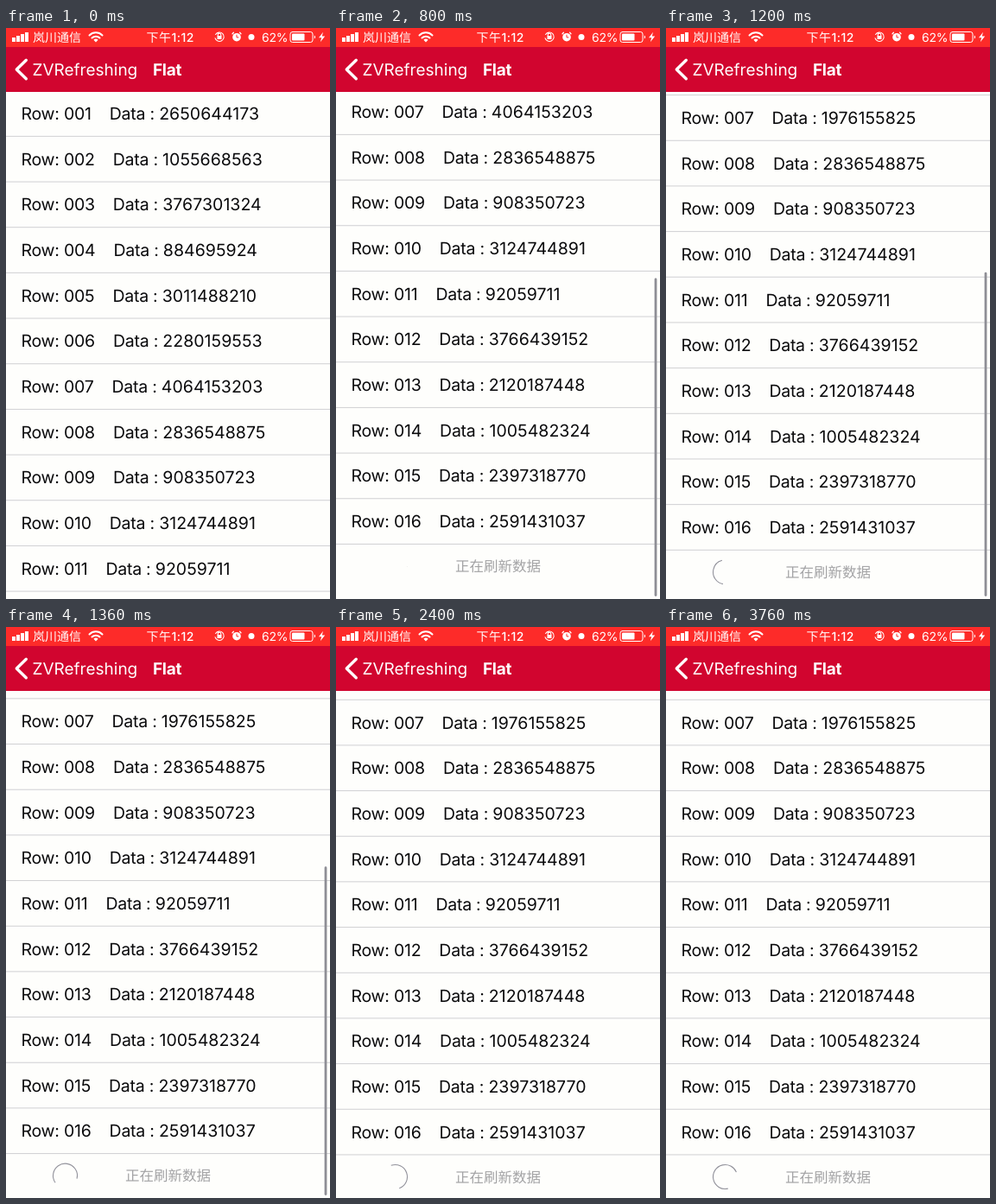
An HTML page that plays this animation: 375x661 px, repeating every 3.84 s.

```html
<!DOCTYPE html>
<html lang="zh-CN">
<head>
<meta charset="utf-8">
<title>Flat list</title>
<style>
  html, body { margin: 0; width: 100%; height: 100%; overflow: hidden; background: #fefefc; }
  svg { display: block; width: 375px; height: 661px; }
  text { font-family: Inter, "Noto Sans CJK SC", "Noto Sans CJK", sans-serif; white-space: pre; text-rendering: geometricPrecision; }
  .row { font-size: 19.5px; letter-spacing: -.24px; fill: #0a0a0c; }
  .value { letter-spacing: .04px; }
  .nav { font-size: 19px; }
  .title { font-weight: 700; letter-spacing: -.28px; }
  .status { font-size: 14px; }
  .line { fill: none; stroke: #fff; stroke-linecap: round; stroke-linejoin: round; }
</style>
</head>
<body>
<svg viewBox="0 0 375 661">
  <rect width="375" height="661" fill="#fefefc"/>
  <g id="content">
    <g id="rows"></g>
    <text x="187.5" y="947.2" font-size="16.5" text-anchor="middle" fill="#a3a3a5">正在刷新数据</text>
    <circle id="spinner" cx="68.5" cy="941" r="14" pathLength="360" fill="none" stroke="#92929b" stroke-width="1.1"/>
  </g>
  <rect id="bar" x="368.6" width="2.8" rx="1.4" fill="#8e8e95"/>

  <rect width="375" height="74" fill="#d1052f"/>
  <rect width="375" height="22" fill="#fd2b29"/>
  <g fill="#fff">
    <path class="line" d="M23.3 37.2 12.3 48 23.3 58.8" stroke-width="3.4"/>
    <text class="nav" x="30.5" y="55">ZVRefreshing</text>
    <text class="nav title" x="170" y="55">Flat</text>

    <path d="M7 11h4v5h-4z M12 9h4v7h-4z M17 7h4v9h-4z M22 5h4v11h-4z"/>
    <text class="status" x="31" y="15.5">岚川通信</text>
    <path class="line" d="M96.5 8.5a10.5 10.5 0 0 1 15 0 M99.5 11.5a6.4 6.4 0 0 1 9 0" stroke-width="2"/>
    <path d="M104 16.5l-2.6-2.8a3.8 3.8 0 0 1 5.2 0z"/>
    <text class="status" x="162.5" y="15.5" font-weight="500" letter-spacing=".5">下午1:12</text>

    <path class="line" d="M242.6 7.5a5.2 5.2 0 1 1-.6 4.2 M245.2 9v-1a1.8 1.8 0 0 1 3.6 0v1" stroke-width="1.1"/>
    <rect x="244.5" y="9" width="5" height="4"/>
    <circle cx="267" cy="10.7" r="4.8"/>
    <path class="line" d="M262 6.7l1.4-1.4 M272 6.7l-1.4-1.4" stroke-width="1.3"/>
    <path d="M267 7.7v3.2h2.4" fill="none" stroke="#fd2b29"/>
    <circle cx="284" cy="10.5" r="3.5"/>
    <text class="status" x="296" y="15.5" letter-spacing="-.2">62%</text>
    <rect class="line" x="329" y="4.5" width="26" height="12" rx="2.5" stroke-width="1"/>
    <rect x="331" y="6.5" width="14.5" height="8" rx="1"/>
    <path d="M356.8 8.5a2.2 2.2 0 0 1 0 4z M367 4.8l-5 6.4h3.2l-1.4 5 5.4-6.6h-3.4z"/>
  </g>
</svg>
<script>
const LOOP = 3840, STEP = 80;
const TOP = 72.7, ROW = 52.67, REST = 304.5;
const DRAG_START = 640, RELEASE = 800, SPIN_START = 780, SPIN = 1150;
const data = [2650644173, 1055668563, 3767301324, 884695924, 3011488210, 2280159553,
  4064153203, 2836548875, 908350723, 3124744891, 92059711, 3766439152,
  2120187448, 1005482324, 2397318770, 2591431037];
const RELOADED = 1976155825;

const $ = id => document.getElementById(id);
const clamp = x => Math.min(1, Math.max(0, x));
const ease = x => (x = clamp(x), x * x * (3 - 2 * x));

$('rows').innerHTML = data.map((value, i) => {
  const y = TOP + i * ROW;
  const number = String(i + 1).padStart(3, '0');
  return `<text class="row" x="17.5" y="${y + 33.3}">Row: ${number}    Data : <tspan class="value">${value}</tspan></text>
    <rect y="${y + ROW - .5}" width="375" height="1" fill="#d0d0d3"/>`;
}).join('');
const seventh = $('rows').querySelectorAll('.value')[6];

// A quick drag, then a critically damped bounce back to the footer.
function scrollAt(t) {
  if (t < RELEASE) return 318 * clamp((t - DRAG_START) / (RELEASE - DRAG_START));
  const s = (t - RELEASE) / 1000;
  return REST + (13.5 + 1980 * s) * Math.exp(-12 * s);
}

function drawBar(t, scroll) {
  const over = Math.max(0, scroll - REST);
  const top = 76 + (scroll - over) * 200 / REST + over;
  $('bar').setAttribute('y', top);
  $('bar').setAttribute('height', Math.min(382, 658 - top));
  $('bar').setAttribute('opacity', t > DRAG_START ? clamp((1760 - t) / 320) : 0);
}

// The arc grows, then its tail catches up, while the whole ring turns.
function drawSpinner(t) {
  const elapsed = t - SPIN_START;
  const phase = elapsed % SPIN / SPIN * 1.5;
  const end = 360 * ease(phase);
  const start = 90 * ease(phase) + 270 * ease((phase - 1) * 2);
  const turn = elapsed / SPIN * 135;
  $('spinner').setAttribute('visibility', elapsed > 0 ? 'visible' : 'hidden');
  $('spinner').setAttribute('stroke-dasharray', `${Math.max(0, end - start)} 400`);
  $('spinner').setAttribute('transform', `rotate(${turn + start} 68.5 941)`);
}

function draw(t) {
  const scroll = scrollAt(t);
  $('content').setAttribute('transform', `translate(0 ${-scroll})`);
  // The cell gets a new value once it has left the screen.
  seventh.textContent = t > RELEASE ? RELOADED : data[6];
  drawBar(t, scroll);
  drawSpinner(t);
}

function tick() {
  const t = performance.now() % LOOP;
  draw(Math.floor(t / STEP) * STEP);
  requestAnimationFrame(tick);
}
tick();
</script>
</body>
</html>
```
